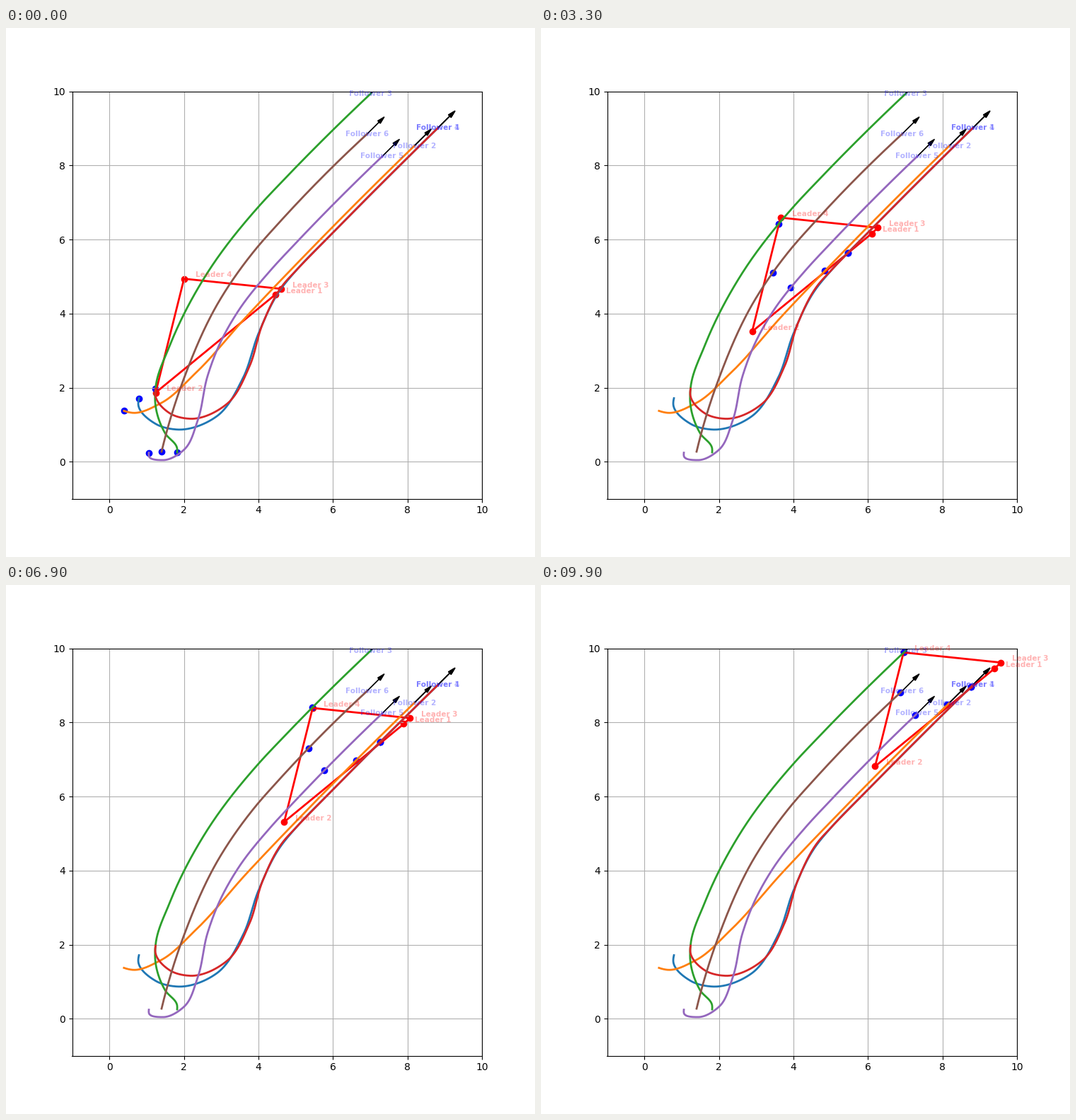
Recreate the animation shown at these times as a matplotlib script. Size 748 by 748 pixels, loop 10 s.

```python
import numpy as np
import matplotlib.pyplot as plt
from matplotlib.animation import FuncAnimation

FRAMES, STEP = 100, 0.1
SPAN = FRAMES * STEP
DRIFT = 0.5                    # leader velocity along each axis
SPEED = DRIFT * np.sqrt(2)

LEADERS = np.array([(4.448, 4.512), (1.24, 1.867), (4.613, 4.67), (2.003, 4.943)])
RING = [0, 1, 3, 2, 0]

# Followers 1 and 4 end on the same line
TAIL = [(5.025, 5.183), (5.879, 6.067), (8.813, 9.014)]
PATHS = [
    [(.793, 1.716), (.774, 1.573), (1.249, 1.019), (1.837, .87), (2.881, 1.229),
     (3.583, 2.26), (4, 3.463), (4.588, 4.648)] + TAIL,
    [(.39, 1.375), (.604, 1.324), (1.363, 1.573), (2.311, 2.394), (3.678, 3.922),
     (5.234, 5.564), (8.177, 8.527)],
    [(1.818, .255), (1.818, .35), (1.495, .771), (1.23, 1.592), (1.239, 1.993),
     (1.628, 3.158), (2.596, 5.049), (4.038, 6.93), (4.645, 7.579), (7.01, 9.94)],
    [(1.239, 1.974), (1.23, 1.821), (1.628, 1.305), (2.179, 1.162), (3.165, 1.573),
     (3.754, 2.566), (4.114, 3.731), (4.66, 4.78)] + TAIL,
    [(1.059, .245), (1.059, .159), (1.438, .045), (2.008, .331), (2.368, 1.114),
     (2.634, 2.317), (2.957, 3.177), (3.459, 4.075), (4.351, 5.202), (4.968, 5.87),
     (7.323, 8.25)],
    [(1.4, .274), (1.989, 2.222), (2.947, 4.342), (3.905, 5.717), (4.541, 6.443),
     (6.915, 8.852)],
]
RATES = [1.62, 1.9, .96, 1.6, .88, .446]
POWERS = [1, 1, 1.05, 1, 1.04, 1.33]


def arc_length(p):
    return np.r_[0, np.cumsum(np.hypot(*np.diff(p, axis=0).T))]


def smooth(points, n=40):
    """Cubic Hermite curve through the points, by chord length."""
    p = np.array(points)
    d = arc_length(p)
    m = np.gradient(p, d, axis=0, edge_order=2)
    u = np.linspace(0, 1, n, endpoint=False)[:, None]
    ease = u * u * (3 - 2 * u)
    parts = [p[i] + ease * (p[i + 1] - p[i])
             + h * u * (1 - u) * ((1 - u) * m[i] - u * m[i + 1])
             for i, h in enumerate(np.diff(d))]
    return np.vstack(parts + [p[-1:]])


def travel(curve, rate, power):
    """Catch up with the formation, then drift along with it."""
    arc = arc_length(curve)
    t = np.arange(FRAMES) * STEP
    lag = np.exp(-rate * t ** power)
    s = SPEED * t + (arc[-1] - SPEED * SPAN) * (1 - lag)
    return np.column_stack([np.interp(s, arc, c) for c in curve.T])


curves = [smooth(p) for p in PATHS]
tracks = np.array([travel(*args) for args in zip(curves, RATES, POWERS)])

fig, ax = plt.subplots(figsize=(7.48, 7.48), dpi=100)
ax.set(xlim=(-1, 10), ylim=(-1, 10))
ax.grid(True)

label = dict(fontsize=7.5, fontweight="bold", alpha=0.3, va="center")
leader_dots = ax.scatter(*LEADERS.T, color="red")
follower_dots = ax.scatter(*tracks[:, 0].T, color="blue")
ring, = ax.plot(*LEADERS[RING].T, color="red", lw=2)

for i, curve in enumerate(curves):
    x, y = curve[-1]
    ax.plot(*curve.T, color=f"C{i}", lw=2)
    ax.arrow(x, y, 0.32, 0.32, head_width=0.1, head_length=0.2, fc="k", ec="k")
    ax.text(x, y, f"Follower {i + 1}", color="blue", ha="center", **label)

names = [ax.text(0, 0, f"Leader {i + 1}", color="red", **label) for i in range(4)]


def update(frame):
    lead = LEADERS + DRIFT * STEP * frame
    leader_dots.set_offsets(lead)
    follower_dots.set_offsets(tracks[:, frame])
    ring.set_data(*lead[RING].T)
    for name, (x, y) in zip(names, lead):
        name.set_position((x + 0.3, y + 0.1))
    return [leader_dots, follower_dots, ring, *names]


anim = FuncAnimation(fig, update, frames=FRAMES, interval=100,
                     repeat=True, repeat_delay=0, blit=False)
plt.show()
```
